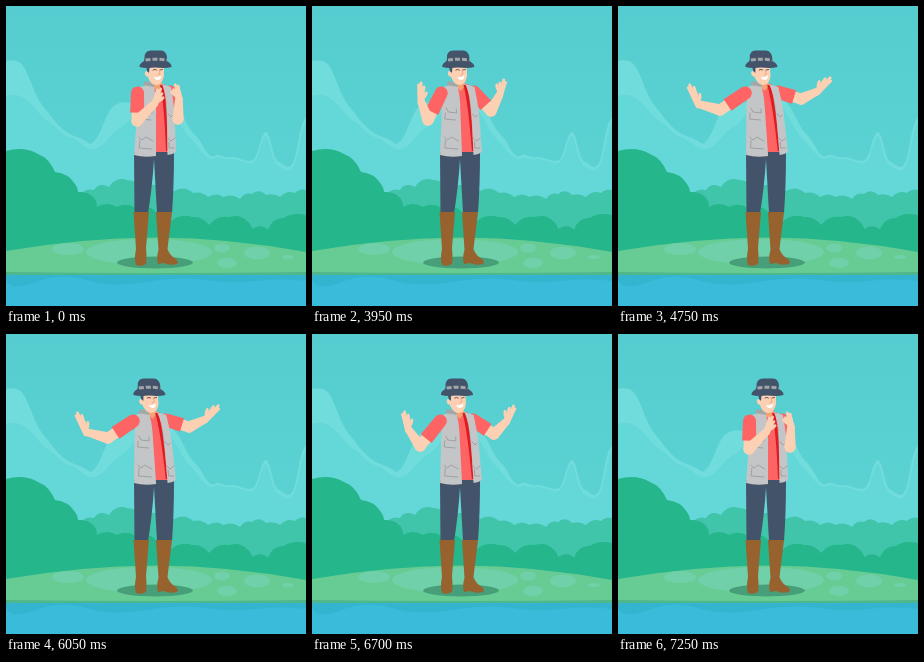
Animation, 300 px wide and 300 px high, one loop 7300 ms. Source, as an HTML page:

```html
<!DOCTYPE html>
<html lang="en">
<head>
<meta charset="utf-8">
<title>Man by the lake</title>
<style>
  html, body { margin: 0; height: 100%; overflow: hidden; background: #57cfd0; }
  svg { display: block; width: 100vw; height: 100vh; }
  .skin { fill: #fcd0b3; }
  .red { fill: #fd6463; }
  .navy { fill: #43536a; }
  .vest { fill: #c4c5c6; }
  .boot { fill: #98622f; }
  .line { fill: none; stroke-linecap: round; stroke-linejoin: round; }
  .hand { stroke: #fcd0b3; }
  .seam { stroke: #96999c; stroke-width: .8; }
</style>
</head>
<body>
<svg viewBox="0 0 300 300">
  <defs>
    <linearGradient id="sky" x2="0" y2="1">
      <stop stop-color="#55cdd0"/><stop offset="1" stop-color="#60d5d4"/>
    </linearGradient>
  </defs>

  <!-- Landscape -->
  <rect width="300" height="300" fill="url(#sky)"/>
  <path fill="#70dddc" d="M0 55Q14 52 19 63C25 74 28 88 36 99C44 108 50 118 58 124C66 131 76 131 84 138C93 135 96 118 104 104Q112 94 124 97C134 94 138 94 143 91Q156 84 166 94C177 104 180 121 189 129C197 136 200 152 208 150C214 146 218 153 225 151C234 151 240 157 247 154C253 149 254 128 260 126C266 129 266 153 273 156C279 159 282 165 287 157C292 147 293 117 300 112V210H0Z"/>
  <path fill="#64d8d9" d="M0 90Q12 86 20 94C29 100 34 111 43 116C52 121 55 130 66 132C75 135 80 146 89 143C101 139 104 127 115 121C125 116 130 102 143 97Q154 91 162 99C172 109 176 125 185 133C193 140 199 154 208 153C214 149 218 155 225 153C234 153 240 159 247 157C254 152 255 132 260 130C264 133 265 157 273 160C279 163 282 168 287 161C293 151 295 121 300 116V210H0Z"/>
  <path fill="#40c4aa" d="M70 245V193Q78 181 88 184Q93 176 103 181Q110 170 121 174Q130 174 134 182Q150 175 168 185Q178 179 187 187Q196 185 202 191Q211 186 217 191Q226 187 234 193Q239 186 246 188Q253 182 260 189Q268 187 274 191Q281 184 289 187Q294 182 300 184V245Z"/>
  <path fill="#25b68b" d="M0 145Q18 140 32 148Q43 152 49 166Q62 167 69 178Q72 182 72 186Q83 185 89 193Q91 197 91 201Q101 195 111 201Q120 196 130 202Q142 197 150 206Q158 204 164 216Q174 207 186 211Q196 210 203 219Q211 209 223 211Q234 208 241 215Q245 218 246 223Q256 217 262 224Q266 212 278 212Q286 206 300 209V250H0Z"/>
  <path fill="#67cc94" d="M0 245Q75 232 150 231.500Q225 232 300 246V268H0Z"/>
  <g fill="#70d0aa">
    <ellipse cx="143" cy="246" rx="63" ry="13"/>
    <ellipse cx="62" cy="243" rx="16" ry="6"/>
    <ellipse cx="216" cy="242" rx="8" ry="4.500"/>
    <ellipse cx="251" cy="247" rx="13" ry="6.500"/>
    <ellipse cx="221" cy="257" rx="10" ry="5"/>
    <ellipse cx="282" cy="251" rx="6" ry="2"/>
  </g>
  <path fill="#38bcda" d="M0 268H300V300H0Z"/>
  <path fill="#34b5cf" d="M0 268H300V275Q275 272 250 275T200 274T140 276T80 274T30 276T0 274Z"/>
  <path fill="#4fb78c" d="M0 266Q75 267 150 267T300 266V269H0Z"/>
  <ellipse cx="149" cy="256.500" rx="38" ry="6" fill="#469f78"/>

  <!-- Legs -->
  <path class="navy" d="M128 146H168Q168 180 166 207H151L148 153Q146 184 142 207H128.500Z"/>
  <path class="boot" d="M127.500 206H143L140 242Q141 252 140 258Q135 261 130 259Q128 252 130 243Z"/>
  <path class="boot" d="M150 206H166L161.500 243Q164 250 170 253Q173 256 171 258Q163 260 158 257L152 258Q150 252 152.500 244Z"/>

  <g id="rightUpper"></g>

  <!-- Torso and head -->
  <g id="body">
    <path class="red" d="M140 79L159 78L163 146H145Z"/>
    <path d="M145 73H155L156 79L151 85L145 79Z" fill="#f2a273"/>
    <path d="M154 79L157 79Q161 95 161.500 145H160Q158 95 154 79Z" fill="#df1a20"/>
    <path class="vest" d="M134 81L147 77Q150 86 150 98V150Q138 152 128 149L131.500 104Q133 92 134 81Z"/>
    <path class="vest" d="M156 78L165 81Q167 92 168.500 106L170 146Q166 149 161.500 149L161 102Q160 88 156 78Z"/>
    <path d="M137 79L139 75L148 77L148 81Z" fill="#a4a7a8"/>
    <path class="line seam" d="M136 102L138 106L146 107V103M135 107L134 113L145 114M133 131L136 134L140 131L147 135M134 134L133 142L146 143M162 108L165 111L167 109M162 132L165 135L169 132M163 136V142H168"/>
    <path class="skin" d="M141 57H158L158 70Q156 79 150 79Q144 78 142 71Q138 70 139 66Q140 64 142 66Z"/>
    <path class="navy" d="M140 59H146L143.500 62L143 67L141 65Z"/>
    <path class="line" d="M147 64Q149 62.500 150.500 64M154 64L156.500 63.500" stroke="#514c50" stroke-width=".9"/>
    <path class="line" d="M153 64L154 68L152 68.500" stroke="#ee9f7a" stroke-width=".8"/>
    <path d="M148 71Q152 72 155.500 69.500Q155 74 151.500 74Q149 74 148 71Z" fill="#fff"/>
    <path class="navy" d="M138.500 52Q138.500 44.500 145 44.500H155Q160.500 44.500 161 52V55Q166 58 165.500 61Q160 62.500 149 61.500Q139 62.500 133.500 61Q133 58 138 55Z"/>
    <path fill="none" d="M139.500 54Q150 52.500 161 54" stroke="#a3a6a7" stroke-width="3" stroke-dasharray="5 2"/>
  </g>

  <g id="leftUpper"></g>
  <g id="foreArms"></g>
</svg>
<script>
const LOOP = 7300, STEP = 50, MOVE = 1250, OPEN = 3600, CLOSE = 6000, POWER = 2.3;
const HIP = 148, LEAN = .07;
const byId = id => document.getElementById(id);

// Progress, then elbow, wrist and fingertip of the left arm and of the right arm
const poses = [
  [0,   131, 115, 149, 97, 155, 82,  172, 113, 173, 92, 169, 78],
  [.09, 130, 116, 138, 95, 144, 79,  172, 112, 175, 92, 175, 77],
  [.53, 116, 114, 109, 95, 109, 76,  179, 105, 188, 88, 192, 73],
  [.74, 108, 112, 96, 95, 92, 77,    182, 100, 195, 87, 202, 71],
  [.88, 103, 108, 86, 95, 80, 76,    183, 97, 198, 86, 208, 71],
  [1,   102, 104, 80, 98, 71, 78,    183, 93, 200, 85, 213, 71]
];

const mix = (a, b, k) => a.map((v, i) => v + (b[i] - v) * k);

function poseAt(p) {
  const i = Math.max(1, poses.findIndex(q => q[0] >= p));
  const a = poses[i - 1], b = poses[i];
  return mix(a, b, (p - a[0]) / (b[0] - a[0])).slice(1);
}

function progress(t) {
  const clamp = x => Math.min(1, Math.max(0, x));
  return t < CLOSE
    ? 1 - (1 - clamp((t - OPEN) / MOVE)) ** POWER
    : 1 - clamp((t - CLOSE) / MOVE) ** POWER;
}

// Tapered limb with half-widths ra and rb, rounded at a
function limb(a, b, ra, rb, cls) {
  const dx = b[0] - a[0], dy = b[1] - a[1], len = Math.hypot(dx, dy);
  const nx = -dy / len, ny = dx / len;
  const at = (q, r) => `${q[0] + nx * r} ${q[1] + ny * r}`;
  return `<path class="${cls}" d="M${at(a, ra)}A${ra} ${ra} 0 0 1 ${at(a, -ra)}L${at(b, -rb)}L${at(b, rb)}Z"/>`;
}

function hand(wrist, tip, side) {
  const dx = tip[0] - wrist[0], dy = tip[1] - wrist[1];
  const angle = Math.atan2(dy, dx) * 180 / Math.PI + 90, len = Math.hypot(dx, dy);
  return `<g class="line hand" transform="translate(${wrist}) rotate(${angle}) scale(${side} 1)">
    <path stroke-width="7" d="M0 1L0 ${-len * .42}"/>
    <path stroke-width="2.800" d="M-2 -6L-2.500 ${3 - len}M0 -7L0 ${1 - len}M2 -7L3 ${5 - len}M1 -2Q4.500 -4 5.500 -8"/></g>`;
}

function draw(now) {
  const t = Math.floor(now % LOOP / STEP) * STEP;
  const p = progress(t), lean = LEAN * p, pose = poseAt(p);
  let fore = '';
  [['left', 131.5, 87, 1], ['right', 164, 86, -1]].forEach(([name, x, y, side], i) => {
    const joint = k => pose.slice(i * 6 + k * 2, i * 6 + k * 2 + 2);
    const top = [x + lean * (y - HIP), y];
    const [elbow, wrist, tip] = [0, 1, 2].map(joint);
    byId(name + 'Upper').innerHTML =
      limb(elbow, top, 5.5, 5.5, 'skin') + limb(top, mix(top, elbow, .7), 6.5, 7, 'red');
    fore += limb(elbow, wrist, 5.7, 3.7, 'skin') + hand(wrist, tip, side);
  });
  byId('foreArms').innerHTML = fore;
  byId('body').setAttribute('transform', `matrix(1 0 ${lean} 1 ${-lean * HIP} 0)`);
}

const start = performance.now();
function tick() {
  draw(performance.now() - start);
  requestAnimationFrame(tick);
}
tick();
</script>
</body>
</html>
```
